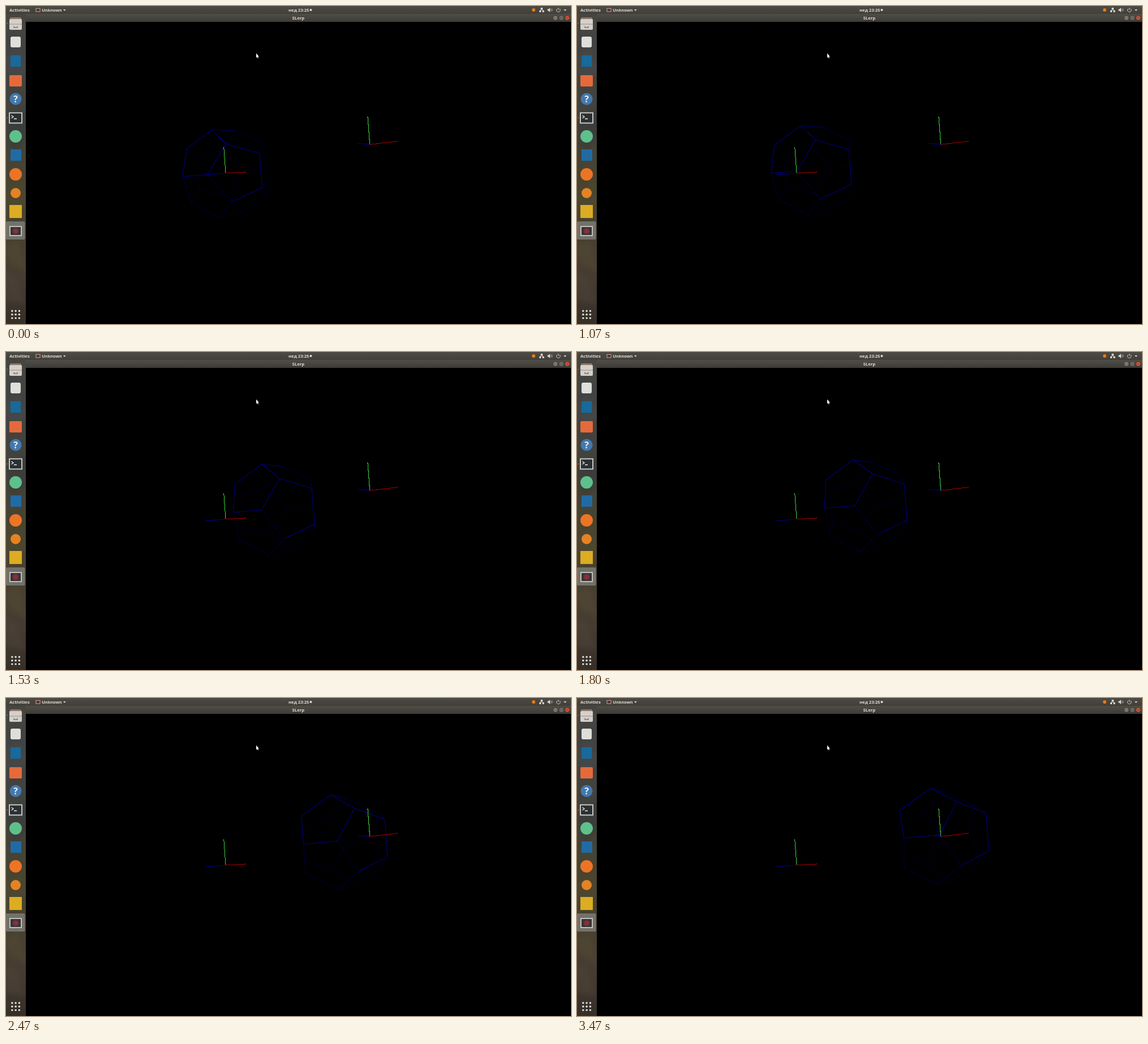
Write an HTML page that moves like this. It is 998 by 561 pixels and loops after 3.51 s.

```html
<!DOCTYPE html>
<html lang="en">
<head>
<meta charset="utf-8">
<title>SLerp</title>
<style>
  html, body { margin: 0; width: 100%; height: 100%; overflow: hidden; background: #000; }
  svg { display: block; width: 998px; height: 561px; }
  text { font: bold 7.7px "Noto Sans", "Open Sans", sans-serif; fill: #dfdbd2; }
  #scene line { stroke-width: 1; shape-rendering: crispEdges; }
</style>
</head>
<body>
<svg viewBox="0 0 998 561" xmlns="http://www.w3.org/2000/svg">
  <defs>
    <linearGradient id="panel" x2="0" y2="1">
      <stop offset="0" stop-color="#4d4b44"/><stop offset="1" stop-color="#413f39"/>
    </linearGradient>
    <linearGradient id="title" x2="0" y2="1">
      <stop offset="0" stop-color="#504e47"/><stop offset="1" stop-color="#3c3b36"/>
    </linearGradient>
    <linearGradient id="dock" x2="0" y2="1">
      <stop offset="0" stop-color="#464540"/><stop offset=".12" stop-color="#414343"/>
      <stop offset=".35" stop-color="#42423c"/><stop offset=".55" stop-color="#48442f"/>
      <stop offset=".72" stop-color="#484030"/><stop offset=".86" stop-color="#463c32"/>
      <stop offset="1" stop-color="#352f28"/>
    </linearGradient>
    <filter id="soft"><feGaussianBlur stdDeviation="4"/></filter>
    <clipPath id="dockClip"><path d="M0 14H35V561H0z"/></clipPath>
  </defs>

  <rect width="998" height="561"/>
  <g id="scene">
    <g id="solid"></g>
    <g id="axes"></g>
  </g>

  <rect y="14" width="35" height="547" fill="url(#dock)"/>
  <g clip-path="url(#dockClip)">
    <g filter="url(#soft)" opacity=".45">
      <path d="M-5 95L20 75 40 110 10 140z" fill="#4b4c4e"/>
      <path d="M0 205L40 180V230L12 260z" fill="#34383a"/>
      <path d="M-4 330L25 312 40 345 5 378z" fill="#514c32"/>
      <path d="M-4 425L22 415 40 470 8 455z" fill="#574c36"/>
      <path d="M0 470L18 480 35 525 0 520z" fill="#50453b"/>
    </g>
    <rect y="380" width="33.5" height="32" rx="2" fill="#74716b"/>
  </g>
  <rect width="998" height="14" fill="url(#panel)"/>
  <rect x="35" y="14" width="963" height="14" fill="url(#title)"/>

  <text x="6" y="10">Activities</text>
  <rect x="53" y="4.3" width="7" height="5.6" fill="#5b2b2b" stroke="#c9b8ae" stroke-width=".9"/>
  <text x="63.2" y="10" style="font-size:7.4px">Unknown</text>
  <path d="M101 6H105.600L103.300 8.800z" fill="#dfdbd2"/>
  <text x="499" y="10">нед 23:25</text>
  <circle cx="538.4" cy="7" r="2" fill="#dfdbd2"/>
  <text x="516.3" y="24" text-anchor="middle">SLerp</text>

  <circle cx="932" cy="7" r="2.9" fill="#ec7c10"/>
  <g fill="#dfdbd2">
    <path d="M944.500 3H948V6H944.500zM942 8H945V11H942zM947.500 8H950.500V11H947.500z"/>
    <path d="M956.500 5.500H958.500L961 3V11L958.500 8.500H956.500z"/>
    <path d="M985 6H990L987.500 8.800z"/>
  </g>
  <g fill="none" stroke="#dfdbd2" stroke-width=".9">
    <path d="M946.200 6V7.200M943.500 8V7.200H949V8"/>
    <path d="M962.300 5.300Q963.600 7 962.300 8.700M964 4.300Q966 7 964 9.700" opacity=".7"/>
    <path d="M973.700 4.700A3.300 3.300 0 1 0 977.700 4.700M975.700 3V7"/>
  </g>
  <g stroke="#3a3934" stroke-width=".8">
    <circle cx="970.500" cy="21" r="4" fill="#85827a"/>
    <circle cx="981" cy="21" r="4" fill="#85827a"/>
    <circle cx="991.400" cy="21" r="4" fill="#ea5533"/>
    <path d="M968.500 21H972.500M979.300 19.500H982.700V22.500H979.300zM989.800 19.400L993 22.600M993 19.400L989.800 22.600" fill="none"/>
  </g>

  <!-- dock -->
  <g>
    <path d="M8 20H26L28 24H6z" fill="#8d7666"/>
    <rect x="6" y="23" width="22" height="19" rx="2" fill="#d5d0c9"/>
    <path d="M6 32H28" stroke="#98928b"/>
    <path d="M14 35.500V38H20V35.500" fill="none" stroke="#77716b" stroke-width="1.300"/>
    <rect x="8" y="54" width="18" height="19" rx="3" fill="#dededa"/>
    <rect x="8" y="87" width="18" height="20" fill="#176a9b"/>
    <rect x="6" y="122" width="22" height="20" rx="2" fill="#e46a3b"/>
    <circle cx="17" cy="164" r="10.500" fill="#4379ad"/>
    <text x="17" y="170" text-anchor="middle" style="font-size:16px;fill:#f2f2f2">?</text>
    <rect x="6" y="188.500" width="22" height="18" fill="#2b3033" stroke="#d4d4d0" stroke-width="1.800"/>
    <path d="M9.500 193L13 195.500 9.500 198M14 199H19" fill="none" stroke="#f1f1f1" stroke-width="1.300"/>
    <circle cx="17" cy="230" r="11" fill="#5fc08c"/>
    <rect x="8" y="253" width="19" height="20" fill="#216ba5"/>
    <circle cx="17" cy="297" r="11" fill="#ed7425"/>
    <circle cx="17" cy="330" r="9" fill="#e58324"/>
    <rect x="6" y="351" width="22" height="23" fill="#dcac22"/>
    <rect x="7" y="389" width="20" height="16" fill="#343635" stroke="#dad8d2" stroke-width="1.600"/>
    <circle cx="17" cy="397" r="5" fill="#862f3c"/>
    <g id="apps" fill="#e9e7e1"></g>
    <g fill="#d64b27">
      <circle cx="2.500" cy="30.500" r="1.100"/><circle cx="2.500" cy="197.500" r="1.100"/><circle cx="2.500" cy="397" r="1.100"/>
    </g>
  </g>

  <path d="M442 83.500V91.300L443.600 89.900 444.800 92.300 445.900 91.700 444.800 89.400H447z" fill="#fff"/>
</svg>

<script>
const LOOP = 3510;
const FOCAL = 643;
const VIEW = [517, 295];
const byId = id => document.getElementById(id);

function addShape(parent, tag, attributes) {
  const node = document.createElementNS("http://www.w3.org/2000/svg", tag);
  setAll(node, attributes);
  parent.appendChild(node);
  return node;
}
function setAll(node, attributes) {
  for (const key in attributes) node.setAttribute(key, attributes[key]);
}

for (let i = 0; i < 9; i++) {
  addShape(byId("apps"), "circle", { cx: 10.8 + (i % 3) * 6.3, cy: 538 + Math.floor(i / 3) * 6.3, r: 1.7 });
}

// Static coordinate frames at both ends of the path.
function addFrame(x, y, tips) {
  ["#a80000", "#3fd43f", "#000098"].forEach((stroke, i) => {
    const [dx, dy] = tips[i];
    addShape(byId("axes"), "line", { x1: x, y1: y, x2: x + dx, y2: y + dy, stroke });
  });
}
addFrame(388, 294.9, [[36.5, -2], [-3.3, -46], [-35, 3]]);
addFrame(642.7, 244.4, [[49.5, -5.8], [-3.8, -49.5], [-22, -2.2]]);

// Dodecahedron: named near vertices, lower case for their antipodes.
const P = (1 + Math.sqrt(5)) / 2, Q = 1 / P;
const vertices = {
  A: [-1, 1, 1], B: [-P, 0, Q], C: [-1, -1, 1], D: [0, -Q, P],
  E: [0, Q, P], F: [1, 1, 1], G: [P, 0, Q], H: [1, -1, 1]
};
for (const name of "ABCDEFGH") vertices[name.toLowerCase()] = vertices[name].map(c => -c);
Object.assign(vertices, { I: [-Q, P, 0], J: [Q, P, 0], K: [Q, -P, 0], L: [-Q, -P, 0] });

const BRIGHT = ["AB", "BC", "CD", "DE", "AE", "EF", "FG", "GH"];
function shade(a, b) {
  if (BRIGHT.includes(a + b)) return 130;
  if (a + b === "AI") return 108;
  return a < "a" && b < "a" ? 52 : 28;
}

const edges = [];
const names = Object.keys(vertices);
names.forEach((a, i) => names.slice(i + 1).forEach(b => {
  const gap = Math.hypot(...vertices[a].map((c, k) => c - vertices[b][k]));
  if (gap > 1.3) return;
  const level = shade(a, b);
  const line = addShape(byId("solid"), "line", { stroke: `rgb(0,0,${level})` });
  edges.push({ a, b, level, line });
}));
edges.sort((m, n) => m.level - n.level).forEach(e => byId("solid").appendChild(e.line));

const ROTATION = [[.8835, .467, -.04], [.44, -.853, -.28], [.165, -.23, .959]];
const START = [-2.705, -.017, 13.86];
const END = [2.49, -1, 12.77];
const PROGRESS = [[805, 0], [830, .012], [1270, .221], [1800, .496], [2070, .627], [2470, .818], [2870, 1]];

function progressAt(t) {
  const next = PROGRESS.findIndex(key => key[0] > t);
  if (next < 0) return 1;
  if (next === 0) return 0;
  const [t0, p0] = PROGRESS[next - 1], [t1, p1] = PROGRESS[next];
  return p0 + (p1 - p0) * (t - t0) / (t1 - t0);
}

function project(vertex, center) {
  const [x, y, z] = ROTATION.map(row => row.reduce((sum, c, i) => sum + c * vertex[i], 0));
  const scale = FOCAL / (center[2] - z);
  return [VIEW[0] + (center[0] + x) * scale, VIEW[1] + (center[1] + y) * scale];
}

function render(t) {
  const p = progressAt(t);
  const center = START.map((c, i) => c + (END[i] - c) * p);
  for (const { a, b, line } of edges) {
    const [x1, y1] = project(vertices[a], center);
    const [x2, y2] = project(vertices[b], center);
    setAll(line, { x1, y1, x2, y2 });
  }
}

const began = performance.now();
function tick() {
  render((performance.now() - began) % LOOP);
  requestAnimationFrame(tick);
}
tick();
</script>
</body>
</html>
```
